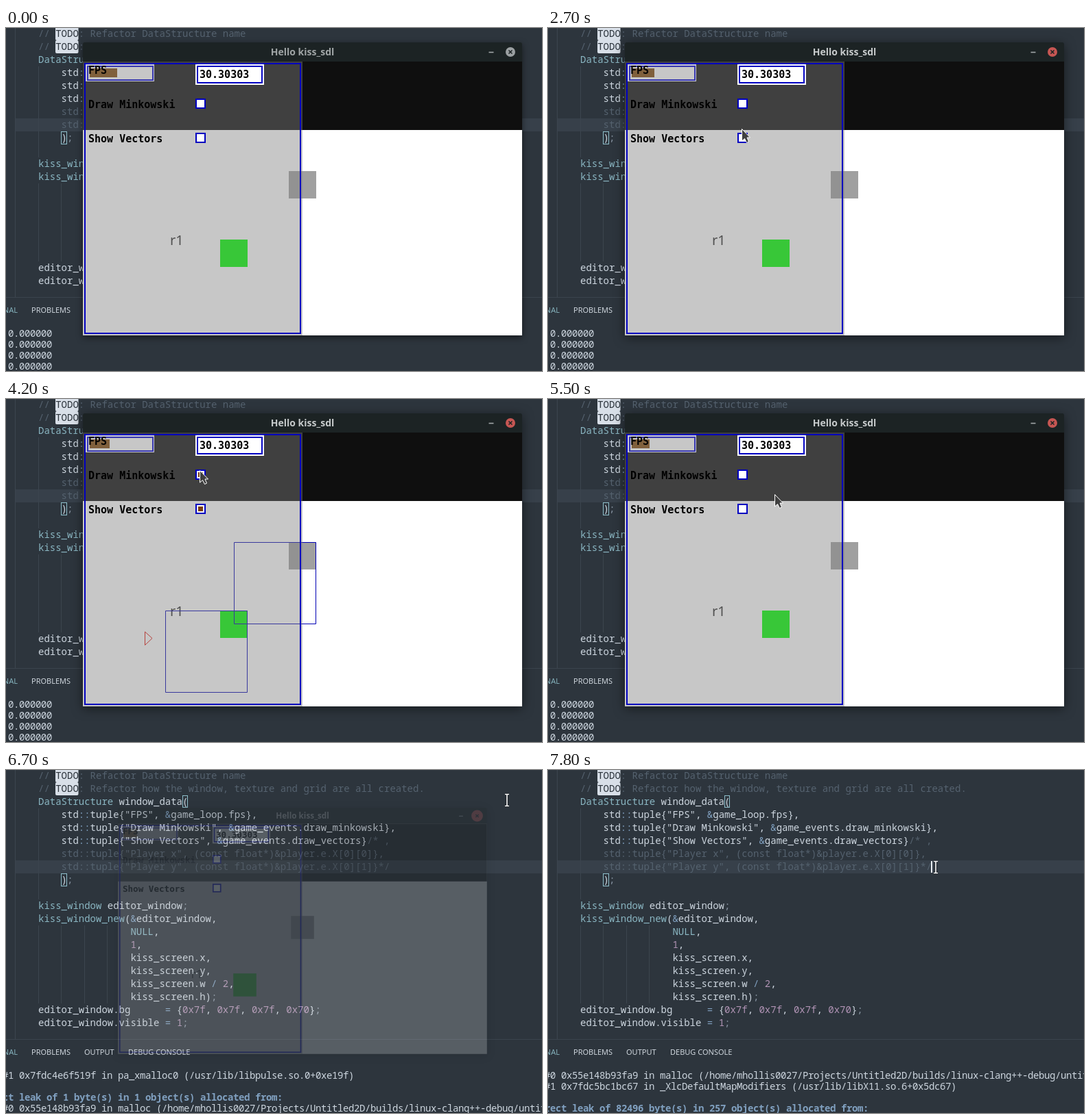
These frames come from a looping animation (781x501 px, 8000 ms). An HTML page:

```html
<!DOCTYPE html>
<html lang="en">
<head>
<meta charset="utf-8">
<title>Hello kiss_sdl</title>
<style>
  html, body { margin: 0; width: 100%; height: 100%; overflow: hidden; background: #2d353d; }
  svg { display: block; }
  text { white-space: pre; }
  .code, .term { font: 14px "Noto Sans Mono", monospace; fill: #cdd6df; }
  .term { letter-spacing: -0.4px; }
  .head { font-weight: bold; fill: #81a1c1; }
  .tab { font: 11px "Noto Sans", sans-serif; fill: #cfd6dd; }
  .label { font: bold 15px "DejaVu Sans Mono", monospace; fill: #000; }
  .title { font: bold 14px "Noto Sans", sans-serif; }
  .type { fill: #8ab6c2; }
  .num { fill: #b093b4; }
  .op { fill: #81a1c1; }
  .dim { fill: #8793a1; }
  .note { fill: #55626f; }
  .todo { fill: #2b333b; }
</style>
</head>
<body>
<svg id="stage" width="781" height="501" viewBox="0 0 781 501">
  <rect width="781" height="501" fill="#2d353d"/>
  <rect x="13" y="132" width="768" height="19" fill="#37404a"/>
  <path d="M13.5 0V393M47.5 56V189M47.5 227V341M80.5 227V341M114.5 227V341M147.5 227V341"
        stroke="#3c454e" fill="none"/>
  <rect x="72" y="-2" width="33.5" height="20" rx="2" fill="#d8dfe8"/>
  <rect x="72" y="18" width="33.5" height="19" rx="2" fill="#d8dfe8"/>
  <g id="code" class="code"></g>
  <g fill="none" stroke="#8fc0cc">
    <rect x="257.5" y="37.5" width="7" height="17"/>
    <rect x="80.5" y="151.5" width="8" height="18"/>
  </g>
  <rect id="caret" x="558" y="133" width="2" height="17" fill="#e8edf2"/>
  <path d="M0 393.5H781" stroke="#3b444d"/>
  <g class="tab">
    <text x="17" y="416" text-anchor="end" style="fill:#86b3bd">TERMINAL</text>
    <text x="37" y="416">PROBLEMS</text>
    <text x="114" y="416">OUTPUT</text>
    <text x="178" y="416">DEBUG CONSOLE</text>
  </g>
  <g id="term" class="term"></g>

  <g id="win">
    <path d="M112 449V24q0-3 3-3H749q3 0 3 3V449z" fill="#1c2324"/>
    <text id="title" class="title" x="432" y="40" text-anchor="middle">Hello kiss_sdl</text>
    <path d="M703.5 35.5H710.5" stroke="#a3a8aa" stroke-width="1.6"/>
    <circle id="close" cx="735" cy="35"/>
    <path id="cross" d="M732.5 32.5l5 5m0-5l-5 5" stroke="#1c2324" stroke-width="1.6"/>
    <rect x="112" y="49" width="640" height="400" fill="#fff"/>
    <rect x="112" y="49" width="640" height="100" fill="#0f0f0f"/>
    <rect x="412" y="209" width="40" height="40" fill="#a0a0a0"/>
    <rect x="312" y="309" width="40" height="40" fill="#0f0"/>
    <text x="239" y="317" font-size="20" font-family="Noto Sans, sans-serif" fill="#2b2b2b">r1</text>
    <path id="minkowski" d="M232.5 309.5h119v119h-119zM332.5 209.5h119v119h-119z" fill="none" stroke="#0000b4"/>
    <path id="vector" d="M202.5 340L213 349.5L202.5 359.5z" fill="none" stroke="#e01008"/>
    <rect x="112" y="49" width="320" height="400" fill="#7f7f7f" fill-opacity=".44"/>
    <rect x="115" y="52" width="314" height="394" fill="none" stroke="#0000c0" stroke-width="2"/>
    <rect x="116" y="53" width="100" height="25" fill="#c9c9d2"/>
    <rect x="119" y="56" width="95" height="20" fill="#c7c7c7" stroke="#3838b0" stroke-width="2"/>
    <rect id="bar" x="122" y="59" height="13" fill="#80603c"/>
    <rect x="276" y="53" width="100" height="30" fill="#fff"/>
    <rect x="279" y="56" width="94" height="24" fill="none" stroke="#0000c0" stroke-width="2"/>
    <g fill="#fff" stroke="#0000c0" stroke-width="2">
      <rect x="277" y="104" width="13" height="13"/>
      <rect x="277" y="154" width="13" height="13"/>
    </g>
    <rect id="tickMinkowski" x="280" y="107" width="7" height="7" fill="#783c10"/>
    <rect id="tickVector" x="280" y="157" width="7" height="7" fill="#783c10"/>
    <g class="label">
      <text x="120" y="67">FPS</text>
      <text x="282" y="73">30.30303</text>
      <text x="120" y="117">Draw Minkowski</text>
      <text x="120" y="167">Show Vectors</text>
    </g>
  </g>

  <path id="arrow" d="M.5 .5V18L4.5 14.5L7.5 20.5L10.5 19L8 13H12.5z" fill="#404040" stroke="#fff" stroke-linejoin="round"/>
  <g id="beam" fill="none">
    <path d="M-3 -8.5H3M0 -8.5V8.5M-3 8.5H3" stroke="#1a1f24" stroke-width="3.4"/>
    <path d="M-3 -8.5H3M0 -8.5V8.5M-3 8.5H3" stroke="#fff" stroke-width="1.6"/>
  </g>
</svg>
<script>
const $ = id => document.getElementById(id);
const LOOP = 8000, STEP = 100;

const source = `// TODO: Refactor DataStructure name
// TODO: Refactor how the window, texture and grid are all created.
DataStructure window_data(
    std::tuple{"FPS", &game_loop.fps},
    std::tuple{"Draw Minkowski", &game_events.draw_minkowski},
    std::tuple{"Show Vectors", &game_events.draw_vectors}/* ,
    std::tuple{"Player x", (const float*)&player.e.X[0][0]},
    std::tuple{"Player y", (const float*)&player.e.X[0][1]}*/
    );

kiss_window editor_window;
kiss_window_new(&editor_window,
                NULL,
                1,
                kiss_screen.x,
                kiss_screen.y,
                kiss_screen.w / 2,
                kiss_screen.h);
editor_window.bg      = {0x7f, 0x7f, 0x7f, 0x70};
editor_window.visible = 1;`.split("\n");

const rules = [
  ["todo", /^TODO/],
  ["note", /^(\/\/ |: Refactor.*|\/\*.*|.*Player.*)/],
  ["type", /^(DataStructure|kiss_window(_new)?\b|NULL)/],
  ["num", /^(0x\w+|\d+)/],
  ["op", /^(::|[&=\/])/],
  ["dim", /^;/],
  ["", /^("[^"]*"|\w+|\s+|.)/]
];

const escape = s => s.replace(/&/g, "&amp;").replace(/</g, "&lt;");

function highlight(line) {
  let out = "";
  while (line) {
    const [name, re] = rules.find(rule => rule[1].test(line));
    const word = line.match(re)[0];
    out += `<tspan class="${name}">${escape(word)}</tspan>`;
    line = line.slice(word.length);
  }
  return out;
}

$("code").innerHTML = source.map((line, row) => {
  const indent = line.search(/\S|$/);
  return `<text x="${47 + indent * 8.4}" y="${13 + row * 19}">${highlight(line.trim())}</text>`;
}).join("");

const malloc = "#0 0x55e148b93fa9 in malloc (/home/mhollis0027/Projects/Untitled2D/builds/linux-clang++-debug/untitled2d+0x11efa9)";
const logs = [
  Array(4).fill(" 0.000000"),
  ["#1 0x7fdc4e6f519f in pa_xmalloc0 (/usr/lib/libpulse.so.0+0xe19f)", "",
    "ct leak of 1 byte(s) in 1 object(s) allocated from:", malloc],
  [malloc, "#1 0x7fdc5bc1bc67 in _XlcDefaultMapModifiers (/usr/lib/libX11.so.6+0x5dc67)", "",
    "rect leak of 82496 byte(s) in 257 object(s) allocated from:"]
];
let shownLog = -1;

function showLog(n) {
  if (n === shownLog) return;
  shownLog = n;
  $("term").innerHTML = logs[n].map((line, i) =>
    `<text x="-5" y="${451 + i * 16}" class="${/leak/.test(line) ? "head" : ""}">${line}</text>`).join("");
}

// Pointer track: time, x, y
const track = [
  [900, 357, 6], [1200, 325, 68], [1500, 295, 112], [1700, 293, 111], [1900, 281, 106],
  [2100, 281, 106], [2400, 281, 163], [2600, 281, 163], [2700, 282, 147], [2900, 281, 155],
  [3300, 281, 156], [3700, 284, 110], [4000, 282, 104], [4800, 282, 104], [5200, 281, 155],
  [5400, 281, 155], [5700, 429, 108], [6000, 706, 50], [6200, 738, 44], [6600, 737, 43],
  [6700, 730, 44], [6900, 724, 98], [7000, 724, 98], [7400, 549, 141], [7600, 549, 141],
  [7700, 558, 142], [7800, 565, 142]
];

function pointerAt(t) {
  const i = track.findIndex(key => key[0] > t);
  if (i < 0) return track[track.length - 1].slice(1);
  if (i === 0) return track[0].slice(1);
  const [a, b] = [track[i - 1], track[i]];
  const k = (t - a[0]) / (b[0] - a[0]);
  return [1, 2].map(n => Math.round(a[n] + (b[n] - a[n]) * k));
}

const set = (id, attrs) => { for (const k in attrs) $(id).setAttribute(k, attrs[k]); };
const show = (id, on) => set(id, { visibility: on ? "inherit" : "hidden" });

function render(t) {
  const focused = t >= 2100, hover = t >= 6200;
  const vectors = t >= 3000 && t < 5200;
  const minkowski = t >= 4100 && t < 4700;

  set("bar", { width: Math.round(40 - 0.0026 * t) });
  show("vector", vectors);
  show("tickVector", vectors);
  show("minkowski", minkowski);
  show("tickMinkowski", minkowski);
  set("title", { fill: focused ? "#c6cacb" : "#a0a5a6" });
  set("close", { r: hover ? 10 : 7, fill: hover ? "#d9595a" : focused ? "#c65653" : "#9ba0a2" });

  // The window shrinks to 80 % while it fades out
  const gone = Math.min(1, Math.max(0, (t - 6600) / 125));
  const scale = 1 - 0.2 * gone;
  set("win", {
    opacity: 1 - gone,
    visibility: gone < 1 ? "visible" : "hidden",
    transform: `translate(432 235) scale(${scale}) translate(-432 -235)`
  });
  $("win").style.filter = `drop-shadow(0 3px ${focused ? 8 : 5}px rgba(0,0,0,.5))`;

  showLog(t < 6700 ? 0 : t < 7100 ? 1 : 2);
  show("caret", t >= 7400);

  const at = `translate(${pointerAt(t)})`;
  set("arrow", { transform: at });
  set("beam", { transform: at });
  show("arrow", t >= 900 && t < 6700);
  show("beam", t >= 6700);
}

const start = performance.now();
function tick() {
  const t = (performance.now() - start) % LOOP;
  render(Math.floor(t / STEP) * STEP);
  requestAnimationFrame(tick);
}
tick();
</script>
</body>
</html>
```
